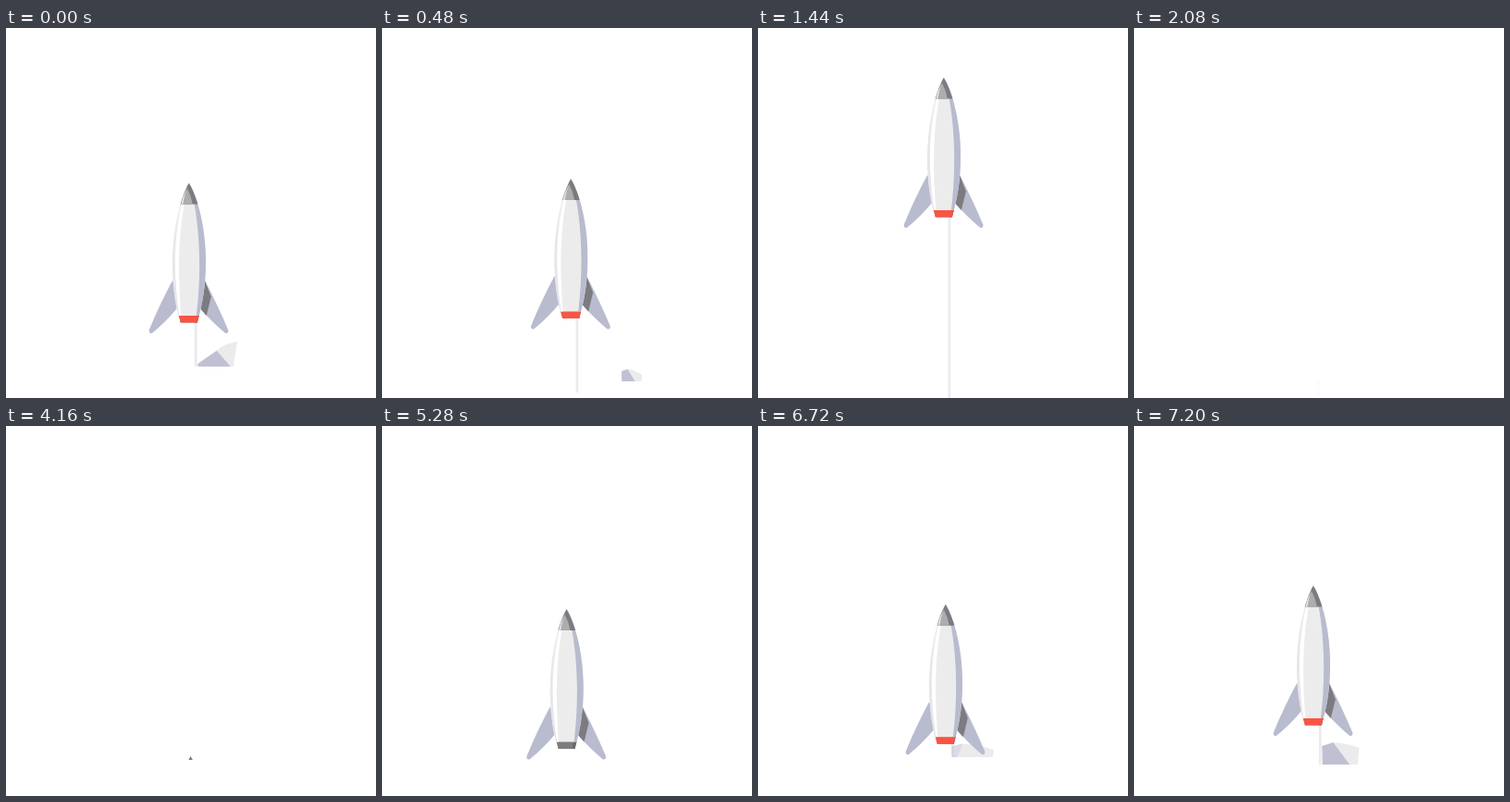
An HTML page for the animation above (7240 ms loop, 400 by 400 pixels).

```html
<!DOCTYPE html>
<html lang="en">
<head>
<meta charset="utf-8">
<title>Rocket launch</title>
<style>
  html, body { margin: 0; width: 100%; height: 100%; overflow: hidden; background: #fff; }
  svg { display: block; width: 100%; height: 100%; }
  .lilac { fill: #b9bbce; }
  .dark { fill: #7b7b80; }
</style>
</head>
<body>
<svg viewBox="0 0 400 400">
  <defs>
    <clipPath id="ground"><rect width="400" height="361"/></clipPath>
    <clipPath id="hull">
      <path d="M199.5 198C186 222 174 283 188 341.5H210.5C226 283 214 222 199.5 198Z"/>
    </clipPath>
  </defs>
  <line id="trail" stroke="#ebebeb"/>
  <line id="residue" x1="199.5" x2="199.5" y1="382" y2="400" stroke="#f5f5f5" stroke-dasharray="4 2"/>
  <g id="smoke">
    <path id="smokeLight" fill="#ebebed"/>
    <path id="smokeShade" fill="#bfc1d2"/>
  </g>
  <g id="frame">
    <g id="rocket">
      <path id="finLeft" class="lilac" d="M182 303Q167 331 156.5 357Q156 361 159.5 360.5Q174 349 189 331Z"/>
      <g id="finRight">
        <path class="lilac" d="M216.5 303Q231 331 242 357Q242.5 361 239 360.5Q225 349 211 333Z"/>
        <path class="dark" d="M216.5 303L223.5 321L218.5 341.5L211 333Z"/>
      </g>
      <g id="nozzle">
        <path class="dark" d="M188.5 341H210.5L208.5 349H190.5Z"/>
        <path fill="#67676c" d="M207 341H210.5L208.5 349H205.5Z"/>
        <path id="heat" fill="#f95444" d="M188.5 341H210.5L208.5 349H190.5Z"/>
      </g>
      <g clip-path="url(#hull)">
        <path fill="#ececec" d="M170 190H230V342H170Z"/>
        <path fill="#fff" d="M199 198C188 222 179 283 189 342H191C187 290 188 245 198 205Z"/>
        <path fill="#e6e6ea" d="M199.5 198C186 222 174 283 188 342H189C181 283 184 245 190 221Z"/>
        <path class="lilac" d="M200 198C211 235 214 290 207.5 342H230V198Z"/>
        <path class="dark" d="M180 195H225V221H180Z"/>
        <path fill="#adadb0" d="M197.5 203.5Q202 212 203.5 221H192Q194 211 197.5 203.5Z"/>
        <path fill="#e8e8e8" d="M197 205Q192.5 213 191 221H193Q194.5 212 197 205Z"/>
      </g>
    </g>
  </g>
</svg>
<script>
const LOOP = 7240, STEP = 40, IGNITION = 5520;
const el = id => document.getElementById(id);
const span = (t, from, to) => Math.min(1, Math.max(0, (t - from) / (to - from)));
const smooth = (t, from, to) => { const u = span(t, from, to); return u * u * (3 - 2 * u); };
const show = (id, on) => el(id).setAttribute('visibility', on ? 'visible' : 'hidden');
const move = (id, x, y) => el(id).setAttribute('transform', `translate(${x} ${y})`);
const set = (id, attrs) => Object.entries(attrs).forEach(([k, v]) => el(id).setAttribute(k, v));

// "burn" is the time since ignition; the shake has a period of five steps
function flightPose(burn) {
  const phase = (burn - 1680) / (5 * STEP) * 2 * Math.PI - Math.PI / 2;
  const calm = (1 - .6 * smooth(burn, 2440, 2560)) * (1 - span(burn, 3000, 3560));
  const shake = 5.7 * smooth(burn, 480, 1600) * calm;
  const lift = 4 * span(burn, 760, 1200) + 29 * smooth(burn, 1440, 1800);
  const flight = 420 * Math.max(0, (burn - 2680) / 1000) ** 1.8;
  return {
    dx: shake * Math.sin(phase),
    dy: .35 * shake * Math.sin(2 * phase) - lift - flight,
    flick: Math.max(-.65, Math.cos(phase))
  };
}

// A folded wedge: it flaps with the shake, grows, then slides off to the right
function drawSmoke(burn, { dx, flick }) {
  const on = burn > 160 && burn < 2440;
  show('smoke', on);
  if (!on) return;
  const age = span(burn, 1200, 1640);
  const out = span(burn, 1720, 2440);
  const size = span(burn, 160, 600) * (1 - out * out);
  const flap = Math.max(0, flick);
  const width = 49 - 6 * age;
  const left = 203 + 3 * age + dx + 70 * out;
  const base = 358 + 8 * age + 24 * out;
  const at = (x, y) => `${left + x * size} ${base - y * size * (.6 + .4 * age)}`;
  const crease = at(15 + 9 * flap, 24 - 7 * flap);
  const foot = at(13 + 20 * age + 6 * flick, 0);
  const bulge = at(width / 2 + 10, 23 + 2 * flick);
  set('smokeShade', {
    d: `M${at(3, 20 - 18 * flap)}L${crease}L${foot}L${at(3.5, 0)}Z`,
    opacity: .6 + .4 * age
  });
  set('smokeLight', {
    d: `M${crease}Q${bulge} ${at(width + 3 * flap, 18 + 9.5 * flick)}L${at(width - 1.5, 0)}L${foot}Z`
  });
}

function drawTrail(burn, { dx, dy }) {
  const on = burn > 1000 && burn < 3800;
  show('trail', on);
  if (!on) return;
  const fade = span(burn, 3240, 3560);
  const nozzle = Math.max(0, 348 + dy);
  const x = 207 - 1.5 * span(burn, 1720, 2720) - 5 * fade + dx;
  set('trail', {
    x1: x, x2: x,
    y1: nozzle + (362 - nozzle) * fade * fade,
    y2: 358 + 8 * span(burn, 1200, 1640) + 34 * span(burn, 1720, 2300),
    'stroke-width': 2.8 - 1.8 * fade
  });
}

function drawRocket(t, burn, { dx, dy }) {
  const building = t >= 4160 && t < IGNITION;
  show('frame', building || burn < 3560);
  set('frame', { 'clip-path': building ? 'url(#ground)' : 'none' });
  const sunk = 163 * (.5 + .5 * Math.cos(Math.PI * span(t, 4080, 4880)));
  move('rocket', building ? 0 : dx, building ? sunk : dy);
  const spread = building ? 21 * (1 - span(t, 4440, 4880)) : 0;
  move('finLeft', -spread, 0);
  move('finRight', spread, 0);
  el('nozzle').style.display = building && t < 5280 ? 'none' : '';
  set('heat', { opacity: building ? 0 : span(burn, 0, 480) });
}

function draw(now) {
  const t = Math.floor((now % LOOP) / STEP) * STEP;
  const burn = (t - IGNITION + LOOP) % LOOP;
  const pose = flightPose(burn);
  drawRocket(t, burn, pose);
  drawSmoke(burn, pose);
  drawTrail(burn, pose);
  show('residue', t >= 2080 && t < 4160);
}

const start = performance.now();
function tick() {
  draw(performance.now() - start);
  requestAnimationFrame(tick);
}
tick();
</script>
</body>
</html>
```
